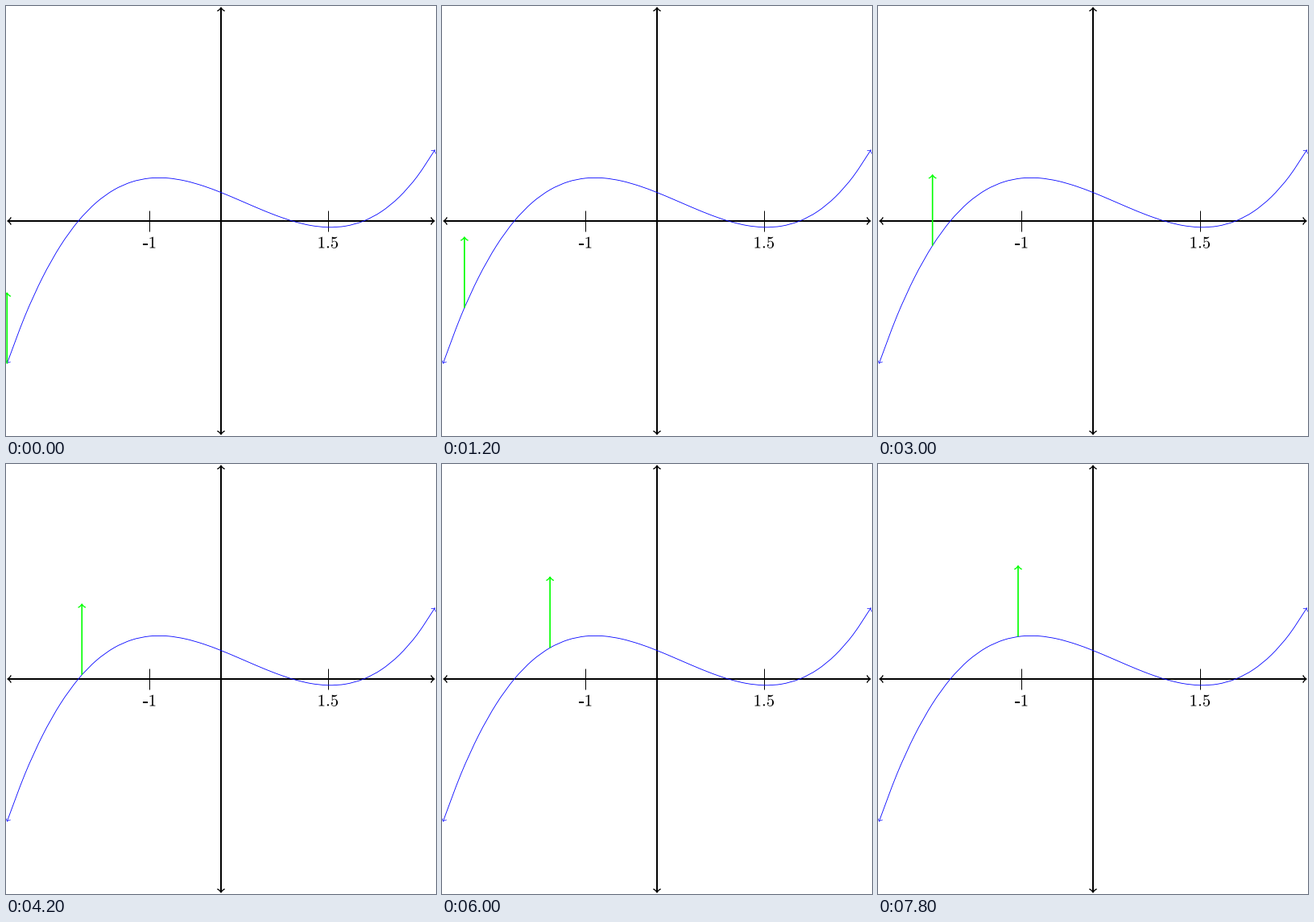
Write a matplotlib script that moves like this. It is 534 by 534 pixels and loops after 8000 ms.

```python
import numpy as np
import matplotlib.pyplot as plt
from matplotlib.animation import FuncAnimation
from matplotlib.patches import PathPatch, Rectangle
from matplotlib.path import Path
from matplotlib.textpath import TextPath

SIZE, DPI = 534, 64
PX = 72 / DPI            # line widths are given in pixels
PT = 150 / 72.27         # one typographic point in pixels
UNIT = 1.5 / 2.54 * 150  # one graph unit in pixels
MID = SIZE / 2
THIN, THICK = 0.4, 0.8   # pen widths in typographic points

FRAMES, STEP = 40, 0.05

plt.rcParams["mathtext.fontset"] = "cm"
fig = plt.figure(figsize=(SIZE / DPI, SIZE / DPI), dpi=DPI, facecolor="white")
ax = fig.add_axes([0, 0, 1, 1])
ax.set_xlim(0, SIZE)
ax.set_ylim(0, SIZE)
ax.axis("off")


def f(x):
    return 0.1 * (x + 2) * (x - 1) * (x - 2)


def pos(x, y):
    return np.array([MID + UNIT * x, MID + UNIT * y])


def setback(pen):
    """Distance from an arrow's tip to the end of its shaft."""
    return (0.21 + 0.625 * pen) * PT


def head_path(tip, way, pen):
    """Curved barbs of an arrow pointing along the vector way."""
    u = np.asarray(way, float) / np.hypot(*way)
    v = np.array([-u[1], u[0]])
    a = (0.28 + 0.3 * pen) * PT
    base = tip - setback(pen) * u
    shape = [(-3, 4), (-2.75, 2.5), (0, 0.25), (0.75, 0),
             (0, -0.25), (-2.75, -2.5), (-3, -4)]
    verts = [base + a * (s * u + t * v) for s, t in shape]
    return Path(verts, [Path.MOVETO] + [Path.CURVE4] * 6)


def add_head(tip, way, pen, color, z):
    patch = PathPatch(head_path(tip, way, pen), fill=False, edgecolor=color,
                      lw=0.8 * pen * PT * PX, capstyle="round",
                      joinstyle="round", zorder=z)
    return ax.add_patch(patch)


def add_line(p, q, width, color, z, snap):
    line, = ax.plot([p[0], q[0]], [p[1], q[1]], color=color, lw=width * PX,
                    solid_capstyle="butt", zorder=z, snap=snap)
    return line


def add_axis(way):
    way = np.array(way, float)
    end = pos(*(3 * way))
    start = pos(*(-3 * way))
    gap = setback(THICK) * way
    add_line(start + gap, end - gap, 2, "black", 1, True)
    add_head(end, way, THICK, "black", 1)
    add_head(start, -way, THICK, "black", 1)


def add_curve():
    """Smooth curve through evenly spaced samples, an arrow at each end."""
    pts = [pos(x, f(x)) for x in np.linspace(-3, 3, 25)]
    bend = 0.2775 * 0.55
    pull = [np.zeros(2)]
    pull += [bend * (c - a) for a, c in zip(pts, pts[2:])]
    pull += [np.zeros(2)]
    ways = [pts[0] - (pts[1] - pull[1]), pts[-1] - (pts[-2] + pull[-2])]
    for i, way in zip((0, -1), ways):
        add_head(pts[i].copy(), way, THIN, "blue", 3)
        pts[i] = pts[i] - setback(THIN) * way / np.hypot(*way)
    verts = [pts[0]]
    for i in range(len(pts) - 1):
        verts += [pts[i] + pull[i], pts[i + 1] - pull[i + 1], pts[i + 1]]
    codes = [Path.MOVETO] + [Path.CURVE4] * (len(verts) - 1)
    ax.add_patch(PathPatch(Path(verts, codes), fill=False, edgecolor="blue",
                           lw=THIN * PT * PX, capstyle="butt", zorder=3))


def add_digits(x, y, digits):
    glyphs = TextPath((x, y), r"$\mathrm{%s}$" % digits, size=10 * PT)
    ax.add_patch(PathPatch(glyphs, facecolor="black", lw=0, zorder=2))


def add_ticks():
    for x in (-1, 1.5):
        add_line(pos(x, -0.15), pos(x, 0.15), 1, "black", 2, True)
    base = pos(0, -0.15)[1] - (3.333 + 6.44) * PT
    add_digits(pos(1.5, 0)[0] - 6.39 * PT, base, "1.5")
    left = pos(-1, 0)[0] - 4.165 * PT
    ax.add_patch(Rectangle((left + 0.11 * PT, base + 1.87 * PT), 2.65 * PT,
                           0.58 * PT, facecolor="black", lw=0, zorder=2))
    add_digits(left + 3.333 * PT, base, "1")


add_axis((1, 0))
add_axis((0, 1))
add_ticks()
add_curve()

UP = np.array([0.0, 1.0])
LIME = "#00ff00"
shaft = add_line((0, 0), (0, 1), THICK * PT, LIME, 4, False)
barbs = add_head(pos(-3, -1), UP, THICK, LIME, 4)


def update(i):
    x = -3 + STEP * i
    foot, tip = pos(x, f(x)), pos(x, f(x) + 1)
    end = tip - setback(THICK) * UP
    shaft.set_data([foot[0], end[0]], [foot[1], end[1]])
    barbs.set_path(head_path(tip, UP, THICK))
    return shaft, barbs


anim = FuncAnimation(fig, update, frames=FRAMES, interval=200, repeat=True,
                     repeat_delay=0, init_func=lambda: update(0))
plt.show()
```
